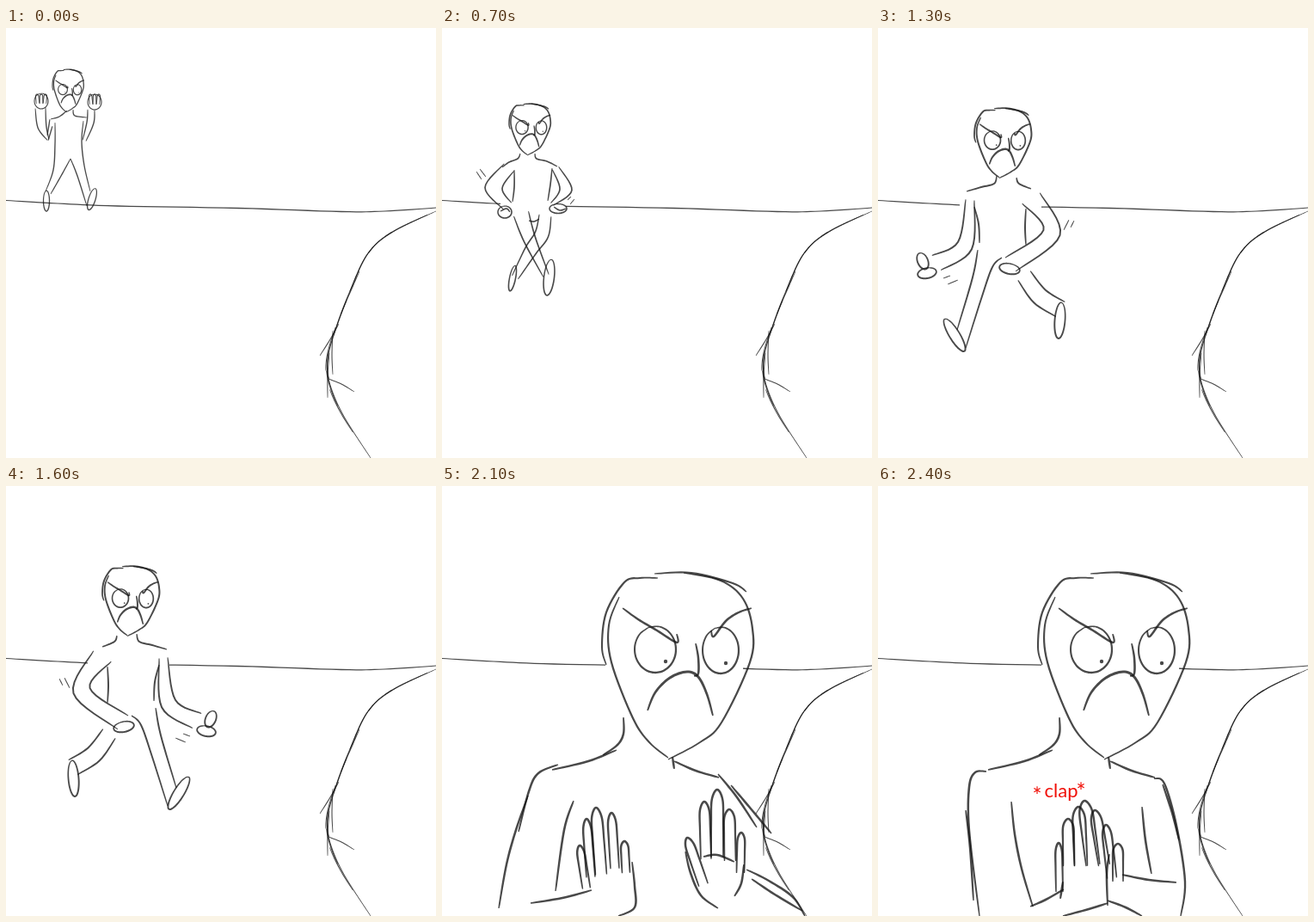
These frames come from a looping animation (500x500 px, 2500 ms). An HTML page with a canvas:

```html
<!DOCTYPE html>
<html lang="en">
<head>
<meta charset="utf-8">
<title>Angry clap</title>
<style>
  html, body { margin: 0; width: 100%; height: 100%; overflow: hidden; background: #fff; }
  canvas { display: block; width: 500px; height: 500px; }
</style>
</head>
<body>
<canvas id="stage"></canvas>
<script>
const STEP = 100, COUNT = 25, GREY = 'rgba(22,22,22,.78)';
const canvas = document.getElementById('stage');
const ctx = canvas.getContext('2d');
const dpr = window.devicePixelRatio || 1;
canvas.width = canvas.height = 500 * dpr;
ctx.scale(dpr, dpr);

let pen = 1;

// Catmull-Rom value between b and c
function between(a, b, c, d, t) {
  const cubic = 3 * (b - c) + d - a;
  const square = 2 * a - 5 * b + 4 * c - d;
  return b + t / 2 * (c - a + t * (square + t * cubic));
}

function smooth(pts) {
  const out = [], last = pts.length - 1;
  for (let i = 0; i < last; i++) {
    const [a, b, c, d] = [pts[Math.max(0, i - 1)], pts[i], pts[i + 1], pts[Math.min(last, i + 2)]];
    for (let t = 0; t < 1; t += 1 / 8)
      out.push([between(a[0], b[0], c[0], d[0], t), between(a[1], b[1], c[1], d[1], t)]);
  }
  return [...out, pts[last]];
}

// Unit normal at point i of a line
function normal(line, i) {
  const p = line[Math.max(0, i - 1)], n = line[Math.min(line.length - 1, i + 1)];
  const dx = n[0] - p[0], dy = n[1] - p[1], len = Math.hypot(dx, dy) || 1;
  return [-dy / len, dx / len];
}

function shifted(line, reach) {
  return line.map((p, i) => {
    const n = normal(line, i), r = reach(i);
    return [p[0] + n[0] * r, p[1] + n[1] * r];
  });
}

// Pencil stroke that thins out at both ends
function brush(pts, width = pen) {
  const line = smooth(pts), last = line.length - 1;
  const half = i => width / 2 * (.5 + .5 * Math.sqrt(Math.max(0, Math.sin(Math.PI * i / last))));
  ctx.beginPath();
  for (const [x, y] of [...shifted(line, half), ...shifted(line, i => -half(i)).reverse()])
    ctx.lineTo(x, y);
  ctx.fillStyle = GREY;
  ctx.fill();
}

// "x,y x,y / x,y" : blanks part the points, slashes the strokes
const parse = text => text.split('/').map(s => s.trim().split(/\s+/).map(p => p.split(',').map(Number)));
const ink = (text, width) => parse(text).forEach(s => brush(s, width));

// Two outlines around a chain of "x,y,radius" joints
function limb(text) {
  for (const joints of parse(text))
    for (const side of [-1, 1]) brush(shifted(joints, i => side * joints[i][2]));
}

function loop(x, y, rx, ry, turn = 0, width = pen) {
  const pts = [];
  for (let i = 0; i <= 12; i++) {
    const a = -1.9 + i / 12 * 2 * Math.PI, u = rx * Math.cos(a), v = ry * Math.sin(a);
    pts.push([x + u * Math.cos(turn) - v * Math.sin(turn), y + u * Math.sin(turn) + v * Math.cos(turn)]);
  }
  brush(pts, width);
}

function dot(x, y, r) {
  ctx.beginPath();
  ctx.arc(x, y, r, 0, 7);
  ctx.fillStyle = GREY;
  ctx.fill();
}

// Narrow arch from a base up to a tip
function finger(bx, by, tx, ty, w) {
  const [nx, ny] = normal([[bx, by], [tx, ty]], 0);
  const at = (u, side) => [bx + (tx - bx) * u + nx * w / 2 * side, by + (ty - by) * u + ny * w / 2 * side];
  brush([at(0, 1), at(.5, 1), at(.85, .9), at(1, 0), at(.85, -.9), at(.5, -1), at(0, -1)]);
}
const fingers = text => parse(text).forEach(([f]) => finger(...f));

function within(x, y, sx, sy, paint) {
  const kept = pen;
  ctx.save();
  ctx.translate(x, y);
  ctx.scale(sx, sy);
  pen /= Math.sqrt(Math.abs(sx * sy));
  paint();
  pen = kept;
  ctx.restore();
}

// Outline with its top left corner at x, y
function skull(x, y, sx, sy) {
  within(x, y, sx, sy, () => ink(`65,7 44,7 26,12 5,47 0,87 5,108 /
    20,29 8,62 11,105 36,170 55,198 77,216 / 61,2 104,1 152,13 168,23 /
    95,1 138,10 164,31 175,66 172,105 139,175 114,198 77,218`));
}

// Features placed around the centre of the left eye
function face(x, y, scale) {
  within(x, y, scale, scale, () => {
    ink('-38,-48 -20,-35 2,-22 25,-8 25,-18 / 112,-48 97,-43 82,-33 68,-15 65,-22 / 47,-7 50,10 50,28 45,31');
    ink('-9,71 0,50 17,33 37,26 50,32 60,52 67,77', pen * 1.2);
    loop(0, 0, 24, 27, 0, pen * .9);
    loop(76, 1, 21, 27, 0, pen * .9);
    dot(12, 14, 2.2);
    dot(82, 16, 2.2);
  });
}

function horizon(...spans) {
  for (const [from, to] of spans) {
    ctx.save();
    ctx.beginPath();
    ctx.rect(from, 190, to - from, 40);
    ctx.clip();
    ink('-20,199.5 0,200.5 60,204 130,207 270,209.5 390,213.5 440,213 500,209 520,207', 1.3);
    ctx.restore();
  }
}

// Rock edge: one curve, gone over again with loose strokes
const EDGE = smooth(parse('500,213 450,237 421,262 400,306 384,348 374,385 376,412 392,450 424,500')[0]);
const LOOSE = [];
let seed = 11;
const random = () => (seed = seed * 16807 % 2147483647) / 2147483647;
for (let i = 0; i < 9; i++) {
  const part = EDGE.slice(i * 6 + 2, i * 6 + 11 + 5 * random());
  const lean = 5 * random() - 2.5, off = 3 * random() - 1.5;
  LOOSE.push(part.map(([x, y], k) => [x + off + lean * (k / part.length - .5), y]));
}

function cliff() {
  brush(EDGE, 1.2);
  LOOSE.forEach(s => brush(s, 1.1));
  ink('387,344 377,362 365,381 / 380,352 379,380 380,403 / 376,378 374,405 374,430 / 375,408 390,414 405,423', 1.1);
}

// ---- far away, shaking fists
function farHand(x, y, open) {
  loop(x, y, open ? 6 : 8, open ? 7 : 9);
  for (let i = -1; i <= 1; i += open ? .66 : 1)
    finger(x + i * 4, y + (open ? -4 : 3), x + i * (open ? 8 : 5), open ? 66 + 5 * i * i : 77, 3.5);
}

function far(open) {
  horizon([0, 500]);
  cliff();
  pen = 1.4;
  skull(54, 48, .206, .229);
  face(66, 71.5, .224);
  limb('40,93,6 42,115,5 49,130,1 / 99,95,4 98,110,4 91,131,2');
  ink(`71,96 62,103 52,106 / 78,95 80,102 94,104 / 49,131 54,114 / 51,106 48,125 /
    57,110 57,135 55,165 46,190 / 75,152 64,172 52,193 / 75,152 83,172 94,207 / 90,108 88,132 91,160 98,190`);
  loop(47, 201, 3.5, 12);
  loop(100, 199, 4, 13, .3);
  pen = 1.2;
  farHand(41, 85, open);
  farHand(103, 86, open);
}

// ---- closer, hands on hips, hopping legs
function hips(spread) {
  horizon([0, 68], [144, 500]);
  cliff();
  pen = 1.7;
  skull(78, 88, .274, .275);
  face(93, 115.5, .296);
  ink(`91,146 88,152 78,156 70,162 / 108,146 110,152 122,155 134,161 /
    84,165 84,185 82,202 / 128,163 126,182 123,201 / 101,224 107,225 113,222`);
  limb('78,162,7 60,186,10 76,207,6 / 132,163,4 144,188,7 128,205,2');
  loop(73, 214, 8, 7);
  loop(135, 210, 10, 5.5);
  ink('68,213 75,210 79,214 / 130,208 137,212 144,210');
  if (spread) {
    limb('92,216,9 77,252,8 58,293,7 / 120,216,7 137,252,8 152,293,7');
    loop(43, 302, 13, 6, -.3);
    loop(166, 302, 13, 6, .3);
  } else {
    limb('92,216,9 102,246,7 121,288,3.5 / 120,218,7 116,240,8 103,259,7 85,290,4');
    loop(124.5, 290, 6, 21, .12);
    loop(82, 291, 3.5, 15, .2);
  }
  ink('40,167 46,176 / 44,164 51,173 / 146,200 150,196 / 149,205 154,199', 1);
}

// ---- marching
function stride() {
  ink(`129,174 126,181 112,187 / 152,172 155,181 170,185 187,190 /
    118,210 119,232 118,252 / 178,208 173,228 172,250 /
    146,267 157,278 170,315 188,372 / 174,258 180,290 198,351`);
  limb('112,198,12 88,238,10 136,275,10 / 183,200,5 189,253,9 222,273,10 / 120,288,9 102,312,10 78,327,10');
  loop(137, 280, 12, 6, -.2);
  loop(238, 271, 6, 10, .4);
  loop(233, 285, 11, 6, .2);
  loop(201, 357, 6, 22, .55);
  loop(78.5, 340, 6, 21, -.08);
  ink('62,224 66,232 / 68,223 74,235 / 197,293 209,298 / 206,288 214,291', 1.1);
}

function walk(mirrored) {
  horizon([0, 95], [190, 500]);
  cliff();
  pen = 2;
  skull(112, 93, .377, .374);
  face(133, 130.5, .395);
  within(mirrored ? 290 : 0, 0, mirrored ? -1 : 1, 1, stride);
}

// ---- close up, clapping
function clapWord() {
  ctx.fillStyle = '#f01008';
  ctx.textAlign = 'center';
  ctx.font = '22px Lato, sans-serif';
  ctx.fillText('clap', 213, 362);
  ctx.font = '26px Lato, sans-serif';
  ctx.fillText('*', 185, 370);
  ctx.fillText('*', 236, 365);
}

function apartPose() {
  ink(`135,324 112,334 101,355 89,402 / 100,360 86,400 75,440 66,491 / 153,366 142,400 132,471 /
    103,485 140,479 174,470 / 321,335 343,362 366,397 / 336,348 358,374 383,404 /
    354,446 380,459 408,478 422,500 / 360,457 387,475 419,494`);
  fingers(`168,468,160,418,9 / 173,455,168,387,10 / 185,452,179,374,13 / 201,445,197,380,10 / 214,450,212,413,9 /
    304,464,285,409,11 / 307,434,305,367,12 / 320,432,320,353,14 / 335,436,334,376,13 / 347,450,348,403,9`);
  ink(`221,437 224,465 224,490 205,500 / 283,425 289,450 301,476 321,491 /
    304,431 320,429 340,437 / 351,440 348,462 340,477`);
}

function clapPose() {
  ink(`126,332 113,333 106,350 106,400 118,500 / 102,377 107,420 111,482 / 155,367 159,405 167,445 180,489 /
    177,489 195,481 216,469 / 321,340 333,346 347,395 357,460 352,500 / 331,347 342,380 350,412 /
    307,373 311,412 318,451 / 284,452 315,458 347,461 / 267,482 288,490 307,500 / 215,500 245,492 267,485`);
  fingers(`211,472,210,415,8 / 222,442,221,387,13 / 236,442,233,373,15 / 250,441,240,366,16 /
    263,441,252,377,13 / 272,456,265,394,11 / 279,460,279,416,12`);
  ink('269,428 266,450 267,488 / 215,460 212,480');
  clapWord();
}

function near(clap) {
  horizon([0, 190], [350, 500]);
  cliff();
  pen = 2.3;
  skull(186, 100, 1, 1);
  pen = 2.6;
  face(248, 190, 1);
  ink('211,269 211,288 204,301 187,313 / 203,307 170,320 128,330 / 268,315 270,329 / 270,320 295,331 322,339');
  (clap ? clapPose : apartPose)();
}

// Each scene swings between two poses, one per step
const SCENES = [
  { start: 19, draw: near },
  { start: 13, draw: odd => walk(!odd) },
  { start: 7, draw: hips },
  { start: 0, draw: far }
];

let shown = -1;
function render(time) {
  const step = Math.floor(time / STEP) % COUNT;
  if (step === shown) return;
  shown = step;
  ctx.fillStyle = '#fff';
  ctx.fillRect(0, 0, 500, 500);
  const scene = SCENES.find(s => step >= s.start);
  scene.draw((step - scene.start) % 2 === 1);
}

const begin = performance.now();
function tick() {
  render(performance.now() - begin);
  requestAnimationFrame(tick);
}
tick();
</script>
</body>
</html>
```
